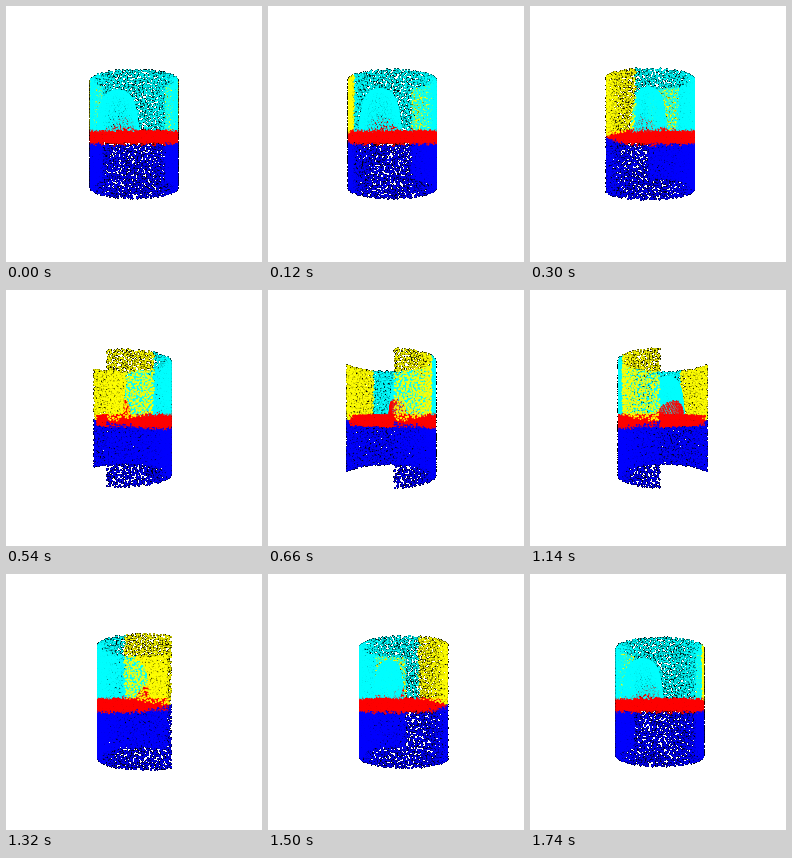
A matplotlib script for the animation above (1800 ms loop, 256 by 256 pixels).

```python
import numpy as np
import matplotlib.pyplot as plt
from matplotlib.animation import FuncAnimation

SIZE, FRAMES, LOOP = 256, 30, 1800
DIST, FOCAL = 3.0, SIZE / 2 / np.tan(np.radians(30))
DOT = 1.28          # point radius in pixels
LAYERS = 8          # points blended per pixel
RADIUS, HEIGHT, CENTER_Z, GAP = 0.6, 0.733, 0.125, 55.3

CYAN, YELLOW, BLUE, RED = (0, 1, 1), (1, 1, 0), (0, 0, 1), (1, 0, 0)
rng = np.random.default_rng(4)


def spread(n):
    """n evenly scattered pairs in the unit square."""
    k = np.arange(n)[:, None]
    return ((k * [0.7548777, 0.5698403]) % 1).T


def paint(rules, n):
    """Colour n points; later rules win."""
    out = np.empty((n, 3))
    for mask, color in rules:
        out[mask] = color
    return out


def make_wall(n):
    s, v = spread(n)
    s, v = s + rng.normal(0, 0.0035, n), v + rng.normal(0, 0.006, n)
    turn = (2 * s.clip(0, 1) - 1) * (180 - GAP)
    t, a = 180 - abs(turn), np.radians(180 - turn)
    y = HEIGHT * (2 * v.clip(0, 1) - 1)
    pts = np.c_[RADIUS * np.sin(a), y, CENTER_Z + RADIUS * np.cos(a)]
    band = 0.085 * np.clip((t - 58) / 45, 0, 1) + rng.normal(0, 0.012, n)
    arm = t + rng.normal(0, 1, n) < 106
    rules = [(y > -0.03, CYAN), ((y > -0.03) & arm, YELLOW),
             (y <= -0.03, BLUE), (abs(y + 0.04) < band, RED)]
    return pts, paint(rules, n)


def make_seat(n):
    u, v = spread(2 * n)
    r, a = RADIUS * np.sqrt(u), 2 * np.pi * v
    x, z = r * np.sin(a), CENTER_Z + r * np.cos(a)
    keep = np.flatnonzero(z < 0.45)[:n]
    y = rng.uniform(-0.105, 0.04, n)
    return np.c_[x[keep], y, z[keep]], np.tile(RED, (n, 1))


def make_cushion(n):
    u, v = spread(n)
    a = 2 * np.pi * v
    y = 0.02 + 0.57 * u
    r = (0.29 - 0.08 * u) * np.sqrt(1 - u ** 6)
    x, z = 0.22 + r * np.cos(a), 0.66 * r * np.sin(a)
    top = np.where(z > -0.02, 0.24, 0.1)
    dome = ((x - 0.15) / 0.22) ** 2 + (y / top) ** 2 < 1
    return np.c_[x, y, z], paint([(y > -1, CYAN), (dome, RED)], n)


parts = [make_wall(9000), make_seat(2600), make_cushion(1500)]
points = np.vstack([p for p, _ in parts])
colors = np.vstack([c for _, c in parts])


def render(i):
    a = np.radians(180 - 360 * i / FRAMES)
    x, y, z = points.T
    depth = DIST - (x * np.sin(a) + z * np.cos(a))
    px = SIZE / 2 + FOCAL * (x * np.cos(a) - z * np.sin(a)) / depth
    py = SIZE / 2 - FOCAL * y / depth

    # every pixel within reach of each point
    dx, dy = (g.ravel() for g in np.mgrid[-2:3, -2:3])
    col = np.floor(px)[:, None].astype(int) + dx
    row = np.floor(py)[:, None].astype(int) + dy
    d2 = (col + 0.5 - px[:, None]) ** 2 + (row + 0.5 - py[:, None]) ** 2
    who, where = np.nonzero(d2 < DOT ** 2)
    alpha = 1 - d2[who, where] / DOT ** 2
    pix = row[who, where] * SIZE + col[who, where]

    order = np.lexsort((depth[who], pix))
    who, alpha, pix = who[order], alpha[order], pix[order]
    _, first, count = np.unique(pix, return_index=True, return_counts=True)
    rank = np.arange(pix.size) - np.repeat(first, count)

    img = np.ones((SIZE * SIZE, 3))
    img[pix] = 0
    clear = np.ones(SIZE * SIZE)
    for k in range(LAYERS):
        m = rank == k
        p = pix[m]
        img[p] += (clear[p] * alpha[m])[:, None] * colors[who[m]]
        clear[p] *= 1 - alpha[m]
    return img.reshape(SIZE, SIZE, 3).clip(0, 1)


fig = plt.figure(figsize=(2.56, 2.56), dpi=100)
ax = fig.add_axes([0, 0, 1, 1])
ax.axis("off")
view = ax.imshow(render(0), interpolation="nearest", aspect="auto")


def update(i):
    view.set_data(render(i))
    return [view]


anim = FuncAnimation(fig, update, frames=FRAMES, interval=LOOP / FRAMES,
                     repeat=True, repeat_delay=0, blit=False)
plt.show()
```
